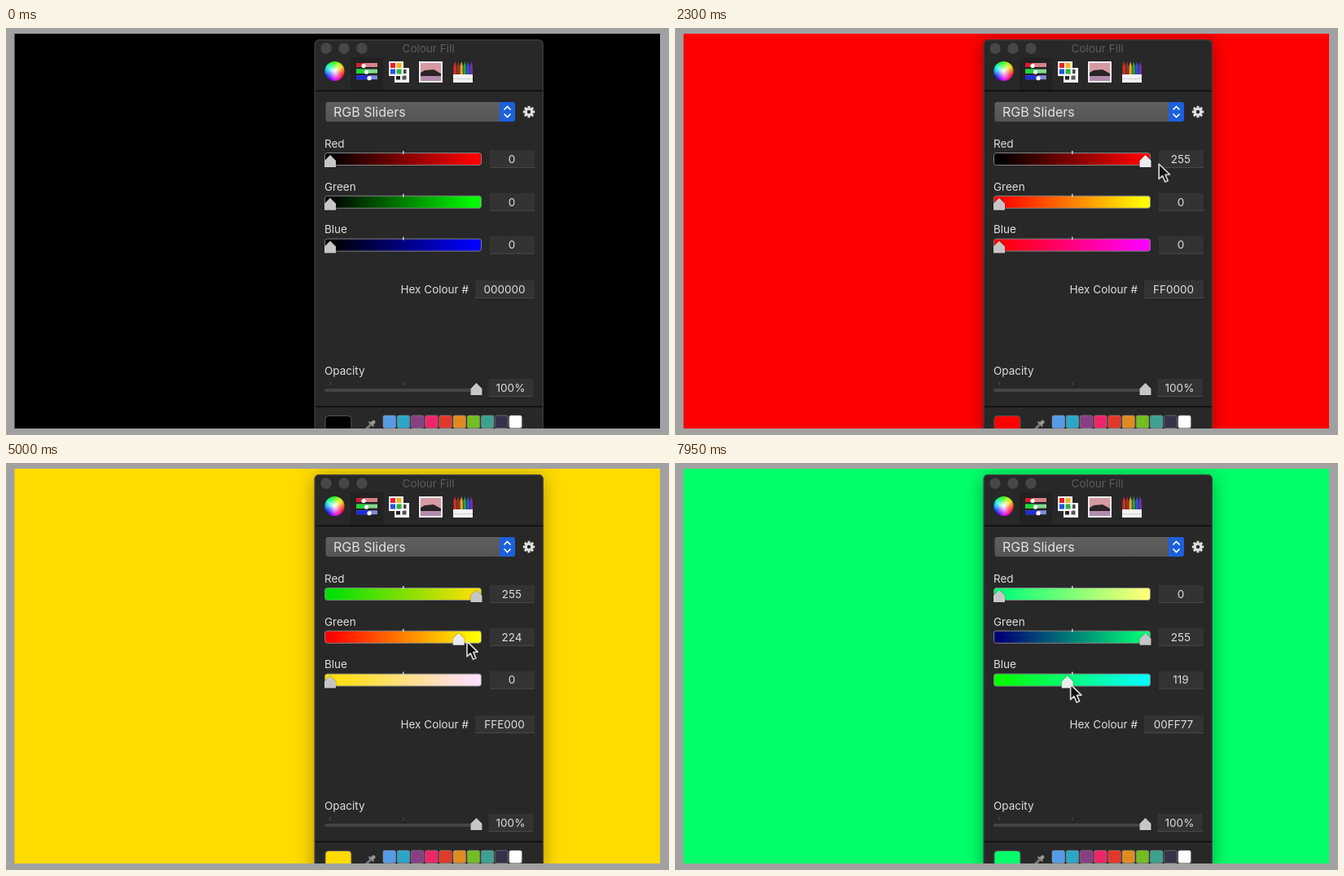
An HTML page with a canvas that plays this animation: 814 by 500 pixels, repeating every 8 s.

```html
<!DOCTYPE html>
<html lang="en">
<head>
<meta charset="utf-8">
<title>RGB sliders</title>
<style>
html, body { margin: 0; width: 100%; height: 100%; overflow: hidden; background: #a1a1a1; }
canvas { display: block; }
</style>
</head>
<body>
<canvas id="stage" width="814" height="500"></canvas>
<script>
const ctx = document.getElementById('stage').getContext('2d');
const LOOP = 8000;
const FONT = 'Inter, "Open Sans", sans-serif';
const PANEL = '#282828', INK = '#dedede', RULE = '#0c0c0c';
const CHANNELS = ['Red', 'Green', 'Blue'];

// The hand travels to a thumb (arrive), then drags it at constant speed.
// The thumb follows the hand after lag ms and stops at the ends of its track.
const drags = [
  { channel: 0, arrive: 930, start: 1500, end: 2280, from: 0, to: 273, lag: 0 },
  { channel: 1, arrive: 3900, start: 4250, end: 5150, from: 0, to: 280, lag: 30 },
  { channel: 0, arrive: 5850, start: 5985, end: 6660, from: 255, to: -6, lag: 90 },
  { channel: 2, arrive: 7450, start: 7600, end: 8000, from: 0, to: 136, lag: 0 }
];

const clamp = (v, lo, hi) => Math.min(hi, Math.max(lo, v));
const mix = (a, b, k) => a + (b - a) * k;
const smooth = k => k * k * (3 - 2 * k);
const progress = (t, a, b) => clamp((t - a) / (b - a), 0, 1);
const thumbX = v => 398 + v / 255 * 179.5;
const sliderY = channel => 161 + channel * 52.8;

function colorAt(t) {
  const color = [0, 0, 0];
  for (const d of drags) {
    if (t < d.start) break;
    const value = mix(d.from, d.to, progress(t - d.lag, d.start, d.end));
    color[d.channel] = Math.round(clamp(value, 0, 255));
  }
  return color;
}

const grip = (d, p) => [thumbX(mix(d.from, d.to, p)) + 1 + 3 * p, sliderY(d.channel) + 2 + 4 * p];

function cursorAt(t) {
  const i = drags.findIndex(d => t <= d.end);
  const d = drags[i], last = drags[i - 1];
  if (t >= d.start) return grip(d, progress(t, d.start, d.end));
  const begin = last ? last.end + 100 : 80;
  const origin = last ? grip(last, 1) : [815, 470];
  const k = smooth(progress(t, begin, d.arrive));
  return grip(d, 0).map((v, n) => mix(origin[n], v, k));
}

const isHeld = (channel, t) =>
  drags.some(d => d.channel === channel && t > d.start - 80 && t < d.end + 100);

const rgb = c => `rgb(${c.map(Math.round).join(',')})`;
const shown = c => rgb(c.map(v => 255 * Math.pow(v / 255, 1.16)));
const hex = c => c.map(v => v.toString(16).padStart(2, '0')).join('').toUpperCase();

function rect(x, y, w, h, color) {
  ctx.fillStyle = color;
  ctx.fillRect(x, y, w, h);
}

function round(x, y, w, h, r, fill, stroke) {
  ctx.beginPath();
  ctx.roundRect(x, y, w, h, r);
  if (fill) { ctx.fillStyle = fill; ctx.fill(); }
  if (stroke) { ctx.strokeStyle = stroke; ctx.lineWidth = 1; ctx.stroke(); }
}

function disc(x, y, r, color) {
  ctx.beginPath();
  ctx.arc(x, y, r, 0, Math.PI * 2);
  ctx.fillStyle = color;
  ctx.fill();
}

function poly(points, fill) {
  ctx.beginPath();
  points.forEach(([x, y]) => ctx.lineTo(x, y));
  ctx.closePath();
  ctx.fillStyle = fill;
  ctx.fill();
}

function text(s, x, y, align = 'left', color = INK, size = 13.5) {
  ctx.font = `${size}px ${FONT}`;
  ctx.textAlign = align;
  ctx.fillStyle = color;
  ctx.fillText(s, x, y + size * 0.36);
}

function field(s, x, y, w) {
  rect(x, y - 11, w, 22, '#333333');
  rect(x, y + 10, w, 1, '#484848');
  text(s, x + w / 2 - 0.5, y, 'center');
}

function thumb(x, y, held) {
  ctx.save();
  ctx.shadowColor = 'rgba(0,0,0,.5)';
  ctx.shadowBlur = 2;
  poly([[x, y - 8], [x + 7, y - 1], [x + 7, y + 7], [x - 7, y + 7], [x - 7, y - 1]],
    held ? '#ececec' : '#c6c6c6');
  ctx.restore();
}

function slider(name, channel, color, t) {
  const y = sliderY(channel);
  const grad = ctx.createLinearGradient(thumbX(0), 0, thumbX(255), 0);
  [0, 255].forEach((v, i) => grad.addColorStop(i, rgb(color.with(channel, v))));
  text(name, 391, y - 19);
  round(391.5, y - 7.5, 192, 15, 3, grad, '#828282');
  rect(487, y - 10, 1.5, 4, '#d0d0d0');
  thumb(thumbX(color[channel]), y + 3, isHeld(channel, t));
  field(String(color[channel]), 594, y, 55);
}

function wheelIcon(x, y) {
  const hues = ctx.createConicGradient(0, x, y);
  for (let i = 0; i <= 12; i++) hues.addColorStop(i / 12, `hsl(${380 - i * 30},95%,52%)`);
  const glow = ctx.createRadialGradient(x, y, 0, x, y, 11);
  glow.addColorStop(0, '#fff');
  glow.addColorStop(1, 'rgba(255,255,255,0)');
  disc(x, y, 12, hues);
  disc(x, y, 12, glow);
}

function slidersIcon(x, y) {
  [355, 128, 235].forEach((hue, i) => {
    const top = y + i * 7.6, knob = 9 + i * 3.5;
    rect(x, top, 26, 5, `hsl(${hue},55%,68%)`);
    rect(x, top, knob, 5, `hsl(${hue},75%,48%)`);
    disc(x + knob, top + 3.5, 2.6, '#fff');
  });
}

function tiles(x, y, size, colors) {
  rect(x, y, 18, 18, '#f8f8f8');
  colors.forEach((c, i) => rect(x + 2 + i % 2 * 7.5, y + 2 + (i >> 1) * 7.5, size, size, c));
}

function pictureIcon(x, y) {
  rect(x, y, 29, 26, '#ececec');
  rect(x + 2, y + 2, 25, 14, '#d69aa2');
  rect(x + 2, y + 16, 25, 8, '#b48cab');
  poly([[x + 2, y + 14], [x + 7, y + 11], [x + 18, y + 10], [x + 27, y + 15], [x + 27, y + 18], [x + 2, y + 18]], '#2a2427');
}

function pencilsIcon(x, y) {
  ['#d92b2b', '#8d3b20', '#e4a224', '#2b9c46', '#2b55cf', '#7431ad'].forEach((c, i) => {
    const left = x + 0.5 + i * 4;
    poly([[left, y + 6], [left + 1.7, y], [left + 3.4, y + 6], [left + 3.4, y + 18], [left, y + 18]], c);
  });
  rect(x, y + 16, 24, 10, '#f3f3f3');
  rect(x, y + 21, 24, 1, '#d2d2d2');
}

function gear(x, y) {
  ctx.save();
  ctx.translate(x, y);
  for (let i = 0; i < 8; i++) {
    rect(-1.5, -7.2, 3, 4, INK);
    ctx.rotate(Math.PI / 4);
  }
  disc(0, 0, 5.3, INK);
  disc(0, 0, 2.2, PANEL);
  ctx.restore();
}

function chevron(x, y, dir) {
  ctx.beginPath();
  ctx.moveTo(x - 4, y);
  ctx.lineTo(x, y + 4 * dir);
  ctx.lineTo(x + 4, y);
  ctx.strokeStyle = '#fff';
  ctx.lineWidth = 1.7;
  ctx.stroke();
}

function panel() {
  ctx.save();
  ctx.shadowColor = 'rgba(0,0,0,.34)';
  ctx.shadowBlur = 22;
  ctx.shadowOffsetY = 2;
  round(378.7, 14.3, 281, 520, 5, PANEL);
  ctx.restore();
  round(379.2, 14.8, 280, 520, 5, null, '#454545');
}

function toolbar() {
  for (let i = 0; i < 3; i++) disc(393 + i * 22, 25, 6.7, '#474747');
  text('Colour Fill', 518.5, 25, 'center', '#5d5d5d');
  rect(423, 36, 40, 41, '#222222');
  wheelIcon(403.5, 53);
  slidersIcon(430, 43);
  tiles(477, 49, 5, ['#777', '#444', '#222', '#555']);
  tiles(470, 41, 6, ['#e8202e', '#f0b41c', '#2353e0', '#2fb23c']);
  pictureIcon(507, 41);
  pencilsIcon(549, 41);
  rect(380, 76.5, 279, 1.5, RULE);
}

function menu() {
  const grad = ctx.createLinearGradient(0, 91, 0, 115);
  grad.addColorStop(0, '#606060');
  grad.addColorStop(1, '#545454');
  round(392.5, 91, 232, 24, 3, grad);
  round(606, 91, 19, 24, [0, 3, 3, 0], '#1c60dc');
  chevron(615.5, 100.5, -1);
  chevron(615.5, 105.5, 1);
  text('RGB Sliders', 402, 103, 'left', '#e2e2e2', 16);
  gear(642, 103);
}

function dropper(x, y) {
  ctx.save();
  ctx.translate(x, y);
  ctx.rotate(Math.PI / 4);
  round(-2, -8, 4.5, 6, 2, '#969696');
  rect(-4, -3, 8, 2, '#969696');
  rect(-1.5, -1, 3, 9, '#777777');
  ctx.restore();
}

function footer(color) {
  text('Opacity', 391, 421.5);
  round(391, 443, 188, 4, 2, '#454545');
  [0, 127.5].forEach(v => rect(thumbX(v) - 0.5, 435, 1.3, 4, '#484848'));
  thumb(thumbX(255), 444, false);
  field('100%', 592.5, 442, 55);
  rect(380, 464.5, 279, 1.5, RULE);
  round(392, 476.5, 32, 30, 4, shown(color), '#555555');
  dropper(447, 488);
  ['#579be8', '#2ca5c7', '#873e83', '#ee2569', '#e0392c', '#e18a20', '#72bd20', '#3da18f', '#34334a', '#ffffff']
    .forEach((c, i) => round(463 + i * 17.2, 476, 15.5, 15.5, 2, c, 'rgba(150,150,150,.5)'));
}

function pointer([x, y]) {
  ctx.save();
  ctx.translate(x, y);
  ctx.lineJoin = 'round';
  poly([[0, 0], [0, 18.5], [4.3, 14.6], [7.6, 22], [11, 20.5], [7.8, 13.3], [13.3, 13]], '#101010');
  ctx.strokeStyle = '#dcdcdc';
  ctx.lineWidth = 1.6;
  ctx.stroke();
  ctx.restore();
}

function draw(t) {
  const color = colorAt(t);
  rect(0, 0, 814, 500, '#a1a1a1');
  ctx.save();
  ctx.beginPath();
  ctx.rect(10.5, 7, 792.5, 485);
  ctx.clip();
  rect(0, 0, 814, 500, shown(color));
  panel();
  toolbar();
  menu();
  CHANNELS.forEach((name, i) => slider(name, i, color, t));
  text('Hex Colour #', 568, 321, 'right');
  field(hex(color), 576, 321, 73);
  footer(color);
  pointer(cursorAt(t));
  ctx.restore();
}

const start = performance.now();
function frame() {
  draw((performance.now() - start) % LOOP);
  requestAnimationFrame(frame);
}
frame();
</script>
</body>
</html>
```
